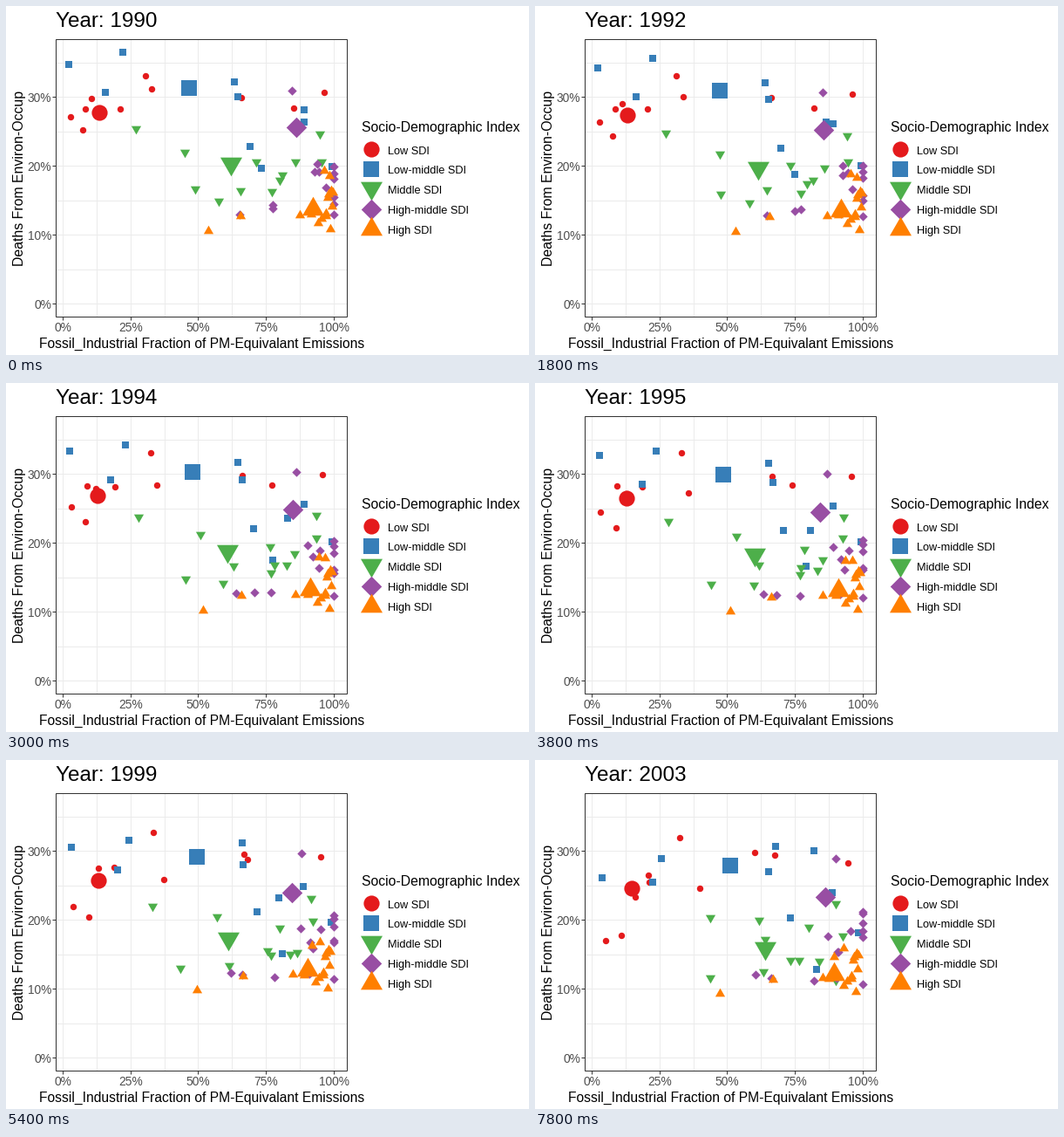
Recreate the animation shown at these times as a matplotlib script. Size 600 by 400 pixels, loop 8 s.

```python
import numpy as np
import matplotlib.pyplot as plt
from matplotlib.animation import FuncAnimation
from matplotlib.patches import Rectangle

PT = 0.72                               # points per pixel at 100 dpi
HOLD, FRAMES, STEP = 5, 40, 200
LAST = FRAMES - HOLD - 1
YEARS_PER_STEP = 27 / 69

plt.rcParams["font.family"] = "Liberation Sans"
fig = plt.figure(figsize=(6, 4), dpi=100, facecolor="white")
ax = fig.add_axes([0, 0, 1, 1])
ax.set_xlim(0, 600)
ax.set_ylim(400, 0)
ax.axis("off")


def label(x, y, s, px, color="black", **kw):
    kw.setdefault("va", "baseline")
    return ax.text(x, y, s, fontsize=px * PT, color=color, **kw)


def line(xs, ys, color, z):
    ax.plot(xs, ys, color=color, lw=PT, zorder=z, solid_capstyle="butt")


def along(path, u):
    """Point at share u of the time on a path of evenly timed key points."""
    t = np.linspace(0, 1, len(path))
    return [np.interp(u, t, v) for v in zip(*path)]


def drift(starts, dx, dy):
    return [[(x, y), (x + dx, y + dy)] for x, y in starts]


class Group:
    """Countries of one index level: small moving marks and one large mean."""

    def __init__(self, name, color, marker, small, large, z, mean, paths):
        style = dict(ls="", marker=marker, color=color, mew=0, antialiased=False)
        self.name, self.style, self.large = name, style, large
        self.mean, self.paths = mean, paths
        self.dots, = ax.plot([], [], ms=small * PT, zorder=z, **style)
        self.big, = ax.plot([], [], ms=large * PT, zorder=z + 0.5, **style)

    def move(self, u):
        self.dots.set_data(*zip(*(along(p, u) for p in self.paths)))
        self.big.set_data(*([v] for v in along(self.mean, u)))

    def key(self, mark_y, text_y):
        ax.plot([419.3], [mark_y], ms=self.large * PT, zorder=5, **self.style)
        label(438, text_y, self.name, 12.8)


H = 0.866
UP = [(-1, -H), (1, -H), (0, H), (-1, -H)]
DOWN = [(-1, H), (1, H), (0, -H), (-1, H)]
DIAMOND = [(0, 1), (1, 0), (0, -1), (-1, 0), (0, 1)]

low = Group(
    "Low SDI", "#E41A1C", "o", 7.4, 18.2, 10,
    [(107, 122), (104, 134), (111, 147)],
    [[(74, 127), (75, 152), (81, 207)],
     [(88, 142), (99, 201)],
     [(91, 118), (95, 118), (131, 140)],
     [(98, 106), (115, 157)],
     [(131, 118), (121, 119), (130, 132)],
     [(160, 80), (170, 80), (166, 89)],
     [(167, 95), (178, 133), (189, 147)],
     [(270, 105), (275, 109)],
     [(330, 117), (288, 117), (252, 106)],
     [(365, 99), (359, 118)]])

lowmid = Group(
    "Low-middle SDI", "#377EB8", "s", 7.4, 17.6, 11,
    [(210, 94), (224, 121)],
    [[(72, 67), (74, 86), (77, 135)],
     [(134, 53), (145, 113)],
     [(114, 99), (135, 140)],
     [(262, 87), (276, 99)],
     [(266, 104), (274, 116), (268, 128)],
     [(280, 161), (293, 181)],
     [(293, 186), (315, 215), (323, 240)],
     [(342, 119), (310, 180), (320, 104)],
     [(342, 133), (341, 152)],
     [(374, 184), (374, 181), (371, 198)]])

mid = Group(
    "Middle SDI", "#4DAF4A", DOWN, 11.2, 25, 12,
    [(258, 184), (251, 204), (264, 219)],
    [[(149, 142), (154, 164), (201, 182)],
     [(205, 169), (236, 179), (257, 185)],
     [(217, 211), (199, 236), (201, 251)],
     [(244, 225), (262, 244)],
     [(269, 213), (255, 209), (264, 207)],
     [(287, 180), (314, 195), (314, 193)],
     [(305, 214), (303, 231)],
     [(314, 201), (293, 231)],
     [(317, 195), (326, 221), (326, 232)],
     [(332, 180), (330, 209), (345, 254)],
     [(360, 148), (345, 166)],
     [(362, 180), (351, 179), (353, 203)]])

# countries at 100% only move up or down
full = [[(376, a), (376, b)] for a, b in
        [(184, 174), (192, 176), (198, 187), (219, 203), (227, 196), (239, 257)]]
highmid = Group(
    "High-middle SDI", "#984EA3", DIAMOND, 10.4, 23.5, 13,
    [(333, 139), (326, 150), (333, 157)],
    full + [
     [(328, 97), (345, 113)],
     [(268, 239), (253, 246)],
     [(306, 232), (271, 245), (271, 250)],
     [(306, 228), (303, 248), (320, 253)],
     [(357, 181), (339, 189), (336, 202)],
     [(354, 190), (347, 220)],
     [(367, 208), (353, 215), (348, 220)],
     [(359, 190), (362, 196)],
     [(352, 236), (346, 250)]])

# the crowd on the right shares one slow drift
crowd = drift([(358, 247), (362, 242), (367, 236), (367, 239), (372, 254),
               (369, 218), (370, 214), (373, 210), (375, 212), (374, 228)], -4, 10)
high = Group(
    "High SDI", "#FF7F00", UP, 11.2, 25, 14,
    [(352, 229), (343, 242)],
    crowd + [
     [(232, 256), (212, 266)],
     [(269, 239), (273, 250)],
     [(337, 238), (328, 243), (330, 248)],
     [(365, 187), (343, 224)],
     [(371, 193), (354, 214)],
     [(350, 237), (337, 249)]])

groups = [low, lowmid, mid, highmid, high]

# panel, grid and axes
L, R, T, B = 57.2, 391.2, 38.2, 356.2
GRID, DARK, TICK = "#EBEBEB", "#333333", "#4D4D4D"
for i in range(9):
    x = 64.8 + 38.9 * i
    line([x, x], [T, B], GRID, 1)
    if i % 2 == 0:
        line([x, x], [B, B + 4], DARK, 3)
        label(x + 0.3, 373, f"{i * 25 // 2}%", 13.8, TICK, ha="center")
for i in range(8):
    y = 341.4 - 39.55 * i
    line([L, R], [y, y], GRID, 1)
    if i % 2 == 0:
        line([L - 4, L], [y, y], DARK, 3)
        label(52, y + 5.6, f"{i * 5}%", 13.8, TICK, ha="right")
ax.add_patch(Rectangle((L, T), R - L, B - T, fill=False, ec=DARK, lw=PT, zorder=20))

label(224.7, 392, "Fossil_Industrial Fraction of PM-Equivalant Emissions", 15.65, ha="center")
label(23, 197, "Deaths From Environ-Occup", 15.9, ha="right", va="center", rotation=90)
title = label(57, 24, "", 24.2)

# legend
label(408, 144, "Socio-Demographic Index", 15.75)
for i, (g, y) in enumerate(zip(groups, [164, 187.4, 212.3, 232.5, 251.7])):
    g.key(y, 169.5 + 22.9 * i)


def draw(n):
    s = max(0, n - HOLD)
    title.set_text(f"Year: {round(1990 + s * YEARS_PER_STEP)}")
    for g in groups:
        g.move(s / LAST)
    return [title]


anim = FuncAnimation(fig, draw, frames=FRAMES, interval=STEP, init_func=lambda: draw(0),
                     repeat=True, repeat_delay=0, blit=False)
plt.show()
```
